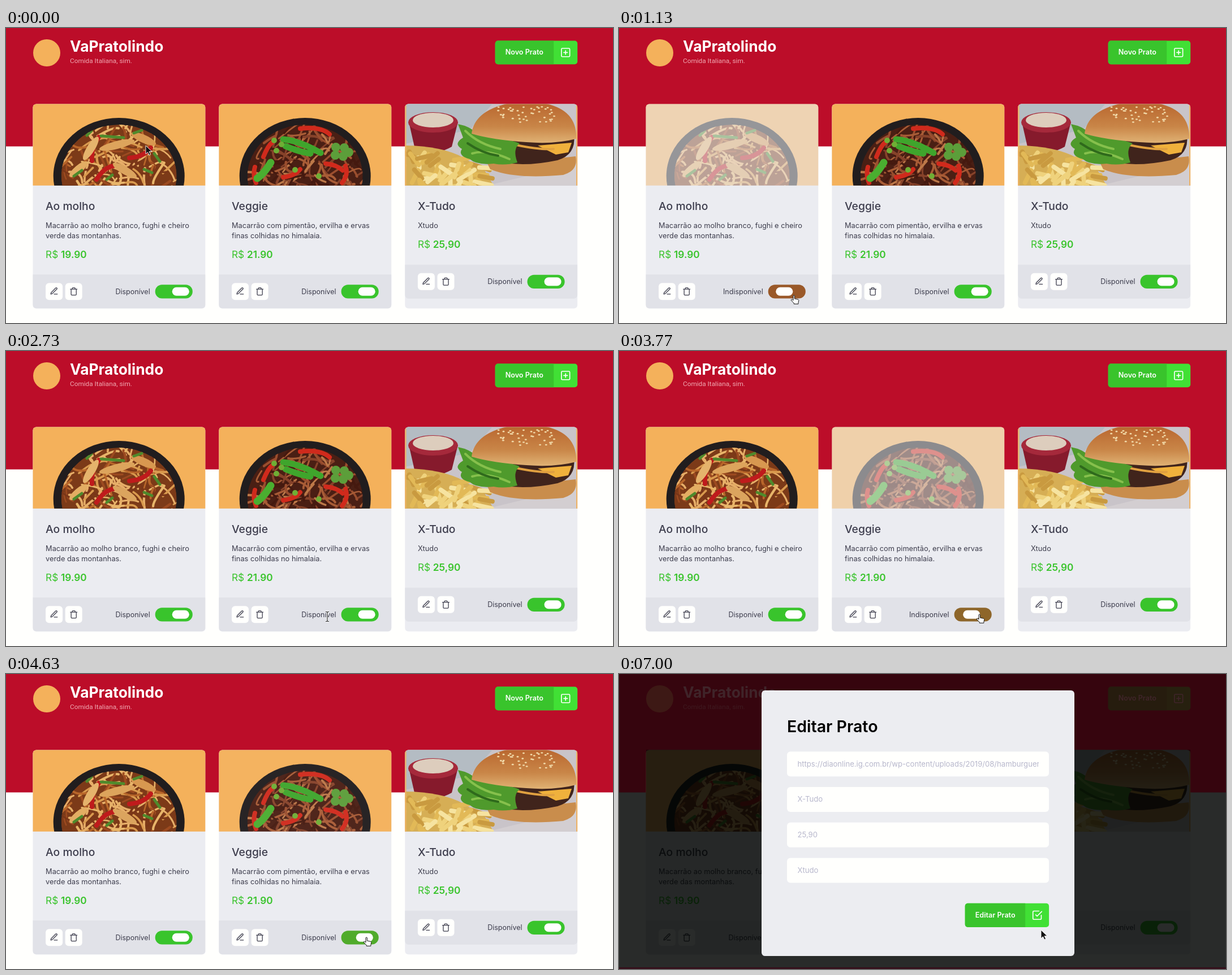
These frames come from a looping animation (1073 by 522 pixels, 8000 ms). An HTML page:

```html
<!DOCTYPE html>
<html lang="pt-BR">
<head>
<meta charset="utf-8">
<title>Cardápio</title>
<style>
  html, body { margin: 0; width: 100%; height: 100%; overflow: hidden; background: #fffffd; }
  svg { display: block; width: 100%; height: 100%; }
  text { font-family: Inter, "Open Sans", sans-serif; font-size: 12.8px; fill: #3d3d4d; white-space: pre; }
  .brand { font-size: 26.4px; font-weight: 700; fill: #fff; }
  .tagline { font-family: Roboto, sans-serif; font-size: 11.8px; fill: #f0a9b2; }
  .action { font-size: 12.6px; font-weight: 600; fill: #fff; }
  .name { font-size: 19.3px; font-weight: 500; }
  .price { font-size: 17.3px; fill: #39c42c; }
  .price .value { font-weight: 600; }
  .label { font-size: 12.5px; text-anchor: end; }
  .heading { font-size: 28.5px; font-weight: 600; fill: #000; }
  .field { font-size: 13.1px; fill: #b7b7cc; }
  .icon { fill: none; stroke: #3d3d4d; stroke-width: 2; stroke-linecap: round; stroke-linejoin: round; }
  .light { stroke: #fff; }
</style>
</head>
<body>
<svg id="stage" viewBox="0 0 1073 522" preserveAspectRatio="none"></svg>
<script>
const LOOP = 8000;
const LEFT = 47.5, TOP = 134.4, STEP_X = 328.9, CARD_W = 304.8, PHOTO_H = 144.4;
const ON = [57, 196, 44], OFF = [199, 40, 40];
const cardX = i => LEFT + STEP_X * i;

const ICONS = {
  edit: 'M12 20h9M16.5 3.5a2.12 2.12 0 0 1 3 3L7 19l-4 1 1-4z',
  trash: 'M3 6h18M19 6v14a2 2 0 0 1-2 2H7a2 2 0 0 1-2-2V6M8 6V4a2 2 0 0 1 2-2h4a2 2 0 0 1 2 2v2',
  plus: 'M5 3h14a2 2 0 0 1 2 2v14a2 2 0 0 1-2 2H5a2 2 0 0 1-2-2V5a2 2 0 0 1 2-2zM12 8v8M8 12h8',
  check: 'M9 11l3 3L22 4M21 12v7a2 2 0 0 1-2 2H5a2 2 0 0 1-2-2V5a2 2 0 0 1 2-2h11'
};

const dishes = [
  { name: 'Ao molho', lines: ['Macarrão ao molho branco, fughi e cheiro', 'verde das montanhas.'],
    price: '19.90', lift: 0, off: 970, on: 2080 },
  { name: 'Veggie', lines: ['Macarrão com pimentão, ervilha e ervas', 'finas colhidas no himalaia.'],
    price: '21.90', lift: 0, off: 3632, on: 4415 },
  { name: 'X-Tudo', lines: ['Xtudo'], price: '25,90', lift: 17.5, off: Infinity, on: Infinity }
];

// Pointer moves: start, step length, step count, control point, end point
const moves = [
  [100, 100, 7, 0, 360, 309, 473],
  [2430, 100, 4, 440, 488, 568, 470],
  [2900, 50, 3, 612, 472, 659, 466],
  [3200, 100, 3, 648, 466, 637, 466],
  [4870, 100, 3, 700, 420, 848, 250],
  [5170, 100, 9, 1131, -150, 921, 385],
  [6100, 100, 1, 880, 400, 841, 410],
  [6200, 80, 6, 790, 430, 746, 453]
];

function random(seed) {
  return () => (seed = (seed * 16807) % 2147483647) / 2147483647;
}

const rect = (x, y, w, h, r, fill, extra = '') =>
  `<rect x="${x}" y="${y}" width="${w}" height="${h}" rx="${r}" fill="${fill}" ${extra}/>`;
const ellipse = (x, y, rx, ry, fill) =>
  `<ellipse cx="${x}" cy="${y}" rx="${rx}" ry="${ry}" fill="${fill}"/>`;
const path = (d, fill) => `<path d="${d}" fill="${fill}"/>`;
const line = (d, color, width) =>
  `<path d="${d}" fill="none" stroke="${color}" stroke-width="${width}" stroke-linecap="round"/>`;
const text = (x, y, cls, str) => `<text x="${x}" y="${y}" class="${cls}">${str}</text>`;
const icon = (name, cx, cy, scale, cls = '') =>
  `<path class="icon ${cls}" d="${ICONS[name]}" transform="translate(${cx} ${cy}) scale(${scale}) translate(-12 -12)"/>`;

function actionButton(x, y, w, h, label, iconName) {
  const split = x + w - 42;
  return rect(x, y, w, h, 5, '#41e035') +
    path(`M${split} ${y}H${x + 5}a5 5 0 0 0-5 5v${h - 10}a5 5 0 0 0 5 5H${split}z`, '#39c42c') +
    text(x + 18, y + h / 2 + 4, 'action', label) +
    icon(iconName, split + 21, y + h / 2, 0.82, 'light');
}

function strands(cx, colors, count, seed) {
  const rnd = random(seed);
  let out = '';
  for (let i = 0; i < count; i++) {
    const a = rnd() * 6.283, r = Math.sqrt(rnd());
    const x = cx + 100 * r * Math.cos(a), y = 262 + 88 * r * Math.sin(a);
    const dir = rnd() * 6.283, len = 16 + rnd() * 26, bend = rnd() * 24 - 12;
    const dx = len * Math.cos(dir), dy = len * Math.sin(dir);
    out += line(`M${x} ${y}q${dx / 2 - bend} ${dy / 2 + bend} ${dx} ${dy}`,
      colors[Math.floor(rnd() * colors.length)], 2.5 + rnd() * 2);
  }
  return out;
}

function bowl(cx, id, base, content) {
  return rect(cx - 154, 134, 308, 146, 0, '#f4b15b') +
    ellipse(cx, 262, 116, 103, '#211d1e') +
    `<g clip-path="url(#food${id})">${ellipse(cx, 262, 102, 91, base)}${content}</g>`;
}

function saucePasta() {
  const chunk = (x, y, turn, color, w = 24) =>
    `<ellipse rx="${w}" ry="7" fill="${color}" transform="translate(${x} ${y}) rotate(${turn})"/>`;
  return bowl(199.7, 0, '#7c3a18',
    strands(199.7, ['#d99a4e', '#e8b56a', '#b8662a', '#7a3618', '#e6ae68', '#9c4a20'], 170, 71) +
    line('M152 235q-2-24 12-42M218 230q26-2 38-18M160 268q14-22 30-24', '#bf1b1c', 8) +
    chunk(196, 207, -14, '#dda45c', 32) + chunk(150, 213, -58, '#e5b36c') +
    chunk(243, 196, 24, '#d89850') + chunk(210, 252, 30, '#dba45e') + chunk(128, 250, -40, '#e3ad63', 20) +
    line('M168 191l40 3M143 190l8-8M120 262l14-10M262 222l10 14M178 268l10-8M244 250l14 6M226 186l14-5', '#4f8a2c', 5));
}

function veggiePasta() {
  let leaves = '';
  for (const [x, y] of [[583, 211], [598, 212], [582, 225], [596, 227], [606, 220]])
    leaves += ellipse(x, y, 8, 8, '#5c9e3a');
  for (const [x, y] of [[474, 199], [487, 206], [478, 217], [553, 262], [511, 251]])
    leaves += ellipse(x, y, 5, 5, '#6fae35');
  return bowl(528.7, 1, '#4a1f14',
    strands(528.7, ['#a85c36', '#86422a', '#bc7848', '#45190f', '#9a4e2e'], 170, 29) +
    line('M520 178q36-4 52 10M455 228q8-20 16-26M600 244q6 16-6 30M490 264q20-2 30-14M565 240q20 2 30 12M440 246q-4 14 2 28', '#d02a1c', 8) +
    line('M490 197q28 2 66 24M494 209q24 10 44 13', '#3fa52c', 11) +
    line('M444 266q12-8 24-28', '#4aae30', 13) + leaves);
}

function burger() {
  const rnd = random(43);
  let fries = '', seeds = '';
  for (let i = 0; i < 46; i++) {
    const x = 700 + rnd() * 140, y = 212 + (x - 700) * 0.15 + rnd() * 68;
    const a = rnd() * 3.1, len = 20 + rnd() * 18;
    fries += line(`M${x} ${y}l${len * Math.cos(a)} ${len * Math.sin(a) * 0.7}`,
      ['#efd27c', '#e2b957', '#f6e3a0', '#c99a40'][i % 4], 8);
  }
  for (let i = 0; i < 42; i++)
    seeds += ellipse(868 + rnd() * 105, 139 + rnd() * 28, 2, 1.3, '#f1d9a8');
  return rect(705, 134, 306, 146, 0, '#c9c4c9') +
    path('M705 134H860L820 180L705 205z', '#b4bcc3') +
    path('M850 279L1010 240V279z', '#d3ced1') +
    path('M712 166L722 210Q754 230 788 210L799 166z', '#861a2c') +
    ellipse(755, 167, 44, 18, '#a5293b') + ellipse(755, 163, 36, 13, '#ddcdbd') +
    path('M705 208Q760 208 800 225L845 250L862 279H705z', '#d6ae55') + fries +
    path('M842 222Q920 238 1007 227Q1012 252 985 260Q900 268 856 250z', '#c98d4c') +
    path('M838 190H1004Q1008 224 975 234Q900 250 850 230z', '#40241c') +
    path('M940 208L1000 203L994 220L972 224z', '#f0b13c') +
    line('M902 207Q945 216 968 214', '#e0a040', 4) +
    path('M799 170Q820 174 832 186Q880 194 908 204Q895 214 904 238Q882 244 862 240Q832 243 820 232Q798 226 806 214Q790 205 808 194z', '#4f9a2c') +
    line('M812 182Q836 206 874 214M824 222Q850 214 890 232', '#86c04c', 4) +
    line('M816 204Q842 222 870 226', '#2f6a1c', 4) +
    path('M823 187Q828 146 890 133H950Q1010 144 1008 196Q970 206 920 202Q860 198 823 187z', 'url(#bun)') + seeds +
    rect(705, 134, 2.5, 146, 0, '#eeb263') + rect(1008, 134, 3, 146, 0, '#eeb263');
}

const photos = [saucePasta, veggiePasta, burger];

function card(dish, i) {
  const x = cardX(i), foot = 436.2 - dish.lift, mid = foot + 30.1;
  const priceY = 406.5 - dish.lift;
  return rect(x, TOP, CARD_W, 361.9, 6, '#ebecf1') +
    `<g clip-path="url(#photo${i})"><g id="photo-${i}">${photos[i]()}</g></g>` +
    text(x + 22.6, 322, 'name', dish.name) +
    dish.lines.map((str, n) => text(x + 22.6, 354 + 17.5 * n, '', str)).join('') +
    text(x + 22.6, priceY, 'price', 'R$') +
    `<g class="price">${text(x + 49.5, priceY, 'price value', dish.price)}</g>` +
    path(`M${x} ${foot}h${CARD_W}v54.1a6 6 0 0 1-6 6h${12 - CARD_W}a6 6 0 0 1-6-6z`, '#e1e2e8') +
    rect(x + 22.6, mid - 15, 30, 30, 6, '#fffffd') + icon('edit', x + 37.5, mid - 0.7, 0.65) +
    rect(x + 57.2, mid - 15, 30, 30, 6, '#fffffd') + icon('trash', x + 72.2, mid - 0.2, 0.65) +
    `<text id="label-${i}" class="label" x="${x + 207.2}" y="${mid + 4.3}"></text>` +
    rect(x + 216.2, mid - 12, 66.1, 24.1, 12, '#39c42c', `id="track-${i}"`) +
    rect(x + 246.2, mid - 7.5, 30.1, 15, 7.5, '#fffffd', `id="knob-${i}"`);
}

function modal() {
  const values = ['https://diaonline.ig.com.br/wp-content/uploads/2019/08/hamburguer-', 'X-Tudo', '25,90', 'Xtudo'];
  return rect(0, 0, 1073, 522, 0, '#000302', 'opacity=".84"') +
    `<path d="M0 0H1073V209.5H1010V134H705V209.5H681V134H377V209.5H353V134H48V209.5H0z" fill="#8c0a28" opacity=".22"/>` +
    rect(0, 519, 1073, 3, 0, '#35101b') +
    rect(252, 29, 553, 470, 6, '#ecedf1') +
    text(297, 103, 'heading', 'Editar Prato') +
    values.map((str, n) => rect(297, 137.3 + 62.7 * n, 463, 44, 6, '#fffffd') +
      `<g clip-path="url(#fields)">${text(315.5, 163.5 + 62.7 * n, 'field', str)}</g>`).join('') +
    actionButton(611.7, 405.8, 148.4, 42.2, 'Editar Prato', 'check');
}

const pointers = {
  arrow: '<path d="M0 0V15l3.5-3.3 2.4 5.3 2.6-1.2-2.4-5.1h5z" fill="#111" stroke="#fff" stroke-width=".9"/>',
  hand: '<path d="M-1 1c0-1.4 2.4-1.4 2.4 0v5l6 1.3c1.2.3 1.5 1 1.3 2.2l-.8 3.8v2H.2v-1.5L-4.5 9c-.8-1.2.6-2.4 1.8-1.4L-1 9z" fill="#fff" stroke="#111"/>',
  beam: ['stroke="#fff" stroke-width="2.4"', 'stroke="#222" stroke-width="1.1"'].map(style =>
    `<path d="M-3-8.5h2l1 1 1-1h2M0-8V7.5M-3 8.5h2l1-1 1 1h2" fill="none" ${style}/>`).join('')
};

const photoClip = i => `<clipPath id="photo${i}"><path d="M${cardX(i)} ${TOP + PHOTO_H}v${6 - PHOTO_H}` +
  `a6 6 0 0 1 6-6h${CARD_W - 12}a6 6 0 0 1 6 6v${PHOTO_H - 6}z"/></clipPath>`;

const stage = document.getElementById('stage');
stage.innerHTML = `<defs>
    <linearGradient id="bun" x1="0" y1="0" x2="0" y2="1">
      <stop offset="0" stop-color="#b9672f"/><stop offset=".6" stop-color="#c98648"/><stop offset="1" stop-color="#e0b274"/>
    </linearGradient>
    <clipPath id="fields"><rect x="315" y="130" width="427" height="250"/></clipPath>
    ${[0, 1].map(i => `<clipPath id="food${i}">${ellipse(199.7 + 329 * i, 262, 102, 91, '#000')}</clipPath>`).join('')}
    ${dishes.map((d, i) => photoClip(i)).join('')}
  </defs>` +
  rect(0, 0, 1073, 522, 0, '#fffffd') + rect(0, 0, 1073, 209.5, 0, '#bc0d29') +
  '<circle cx="72" cy="44" r="24" fill="#f4b15b"/>' +
  text(113, 41.5, 'brand', 'VaPratolindo') + text(113, 62, 'tagline', 'Comida Italiana, sim.') +
  actionButton(864.7, 22.5, 145.5, 41.8, 'Novo Prato', 'plus') +
  dishes.map(card).join('') +
  `<g id="modal">${modal()}</g><g id="pointer">` +
  Object.entries(pointers).map(([k, shape]) => `<g id="${k}">${shape}</g>`).join('') + '</g>';

const el = id => document.getElementById(id);
const clamp = v => Math.min(1, Math.max(0, v));

// cubic-bezier(.25, .1, .25, 1)
function ease(p) {
  if (p <= 0) return 0;
  if (p >= 1) return 1;
  const curve = (a, b, s) => 3 * a * s * (1 - s) ** 2 + 3 * b * s * s * (1 - s) + s ** 3;
  let lo = 0, hi = 1;
  for (let i = 0; i < 24; i++) {
    const mid = (lo + hi) / 2;
    if (curve(0.25, 0.25, mid) < p) lo = mid; else hi = mid;
  }
  return curve(0.1, 1, lo);
}

const level = (t, dish, duration) =>
  1 - ease((t - dish.off) / duration) + ease((t - dish.on) / duration);

function pointerAt(t) {
  let x = 247, y = 208;
  for (const [start, dt, count, cx, cy, ex, ey] of moves) {
    if (t < start) break;
    const p = Math.min(count, Math.floor((t - start) / dt) + 1) / count;
    const u = p * p * (3 - 2 * p), v = 1 - u;
    x = v * v * x + 2 * u * v * cx + u * u * ex;
    y = v * v * y + 2 * u * v * cy + u * u * ey;
  }
  return [x, y];
}

function pointerKind(x, y, t) {
  if (t >= 6830) return 'arrow';
  for (let i = 0; i < dishes.length; i++) {
    const dx = x - cardX(i), dy = y - 466 + dishes[i].lift;
    const inside = (a, b, h) => dx >= a && dx <= b && Math.abs(dy) <= h;
    if (inside(216, 282, 12) || inside(22, 52, 15) || inside(57, 87, 15)) return 'hand';
    if (inside(144, 207, 9)) return 'beam';
  }
  return 'arrow';
}

function draw(t) {
  dishes.forEach((dish, i) => {
    const on = level(t, dish, 400);
    const color = OFF.map((c, n) => Math.round(c + (ON[n] - c) * on));
    el('track-' + i).setAttribute('fill', `rgb(${color})`);
    el('knob-' + i).setAttribute('x', cardX(i) + 222.2 + 24 * on);
    el('photo-' + i).setAttribute('opacity', 0.3 + 0.7 * level(t, dish, 300));
    el('label-' + i).textContent = t >= dish.off && t < dish.on ? 'Indisponível' : 'Disponível';
  });
  el('modal').setAttribute('opacity', clamp((t - 6790) / 200));
  const [x, y] = pointerAt(t), kind = pointerKind(x, y, t);
  el('pointer').setAttribute('transform', `translate(${x} ${y})`);
  for (const k in pointers) el(k).setAttribute('display', k === kind ? 'inline' : 'none');
}

const begin = performance.now();
function tick() {
  draw((performance.now() - begin) % LOOP);
  requestAnimationFrame(tick);
}
tick();
</script>
</body>
</html>
```
